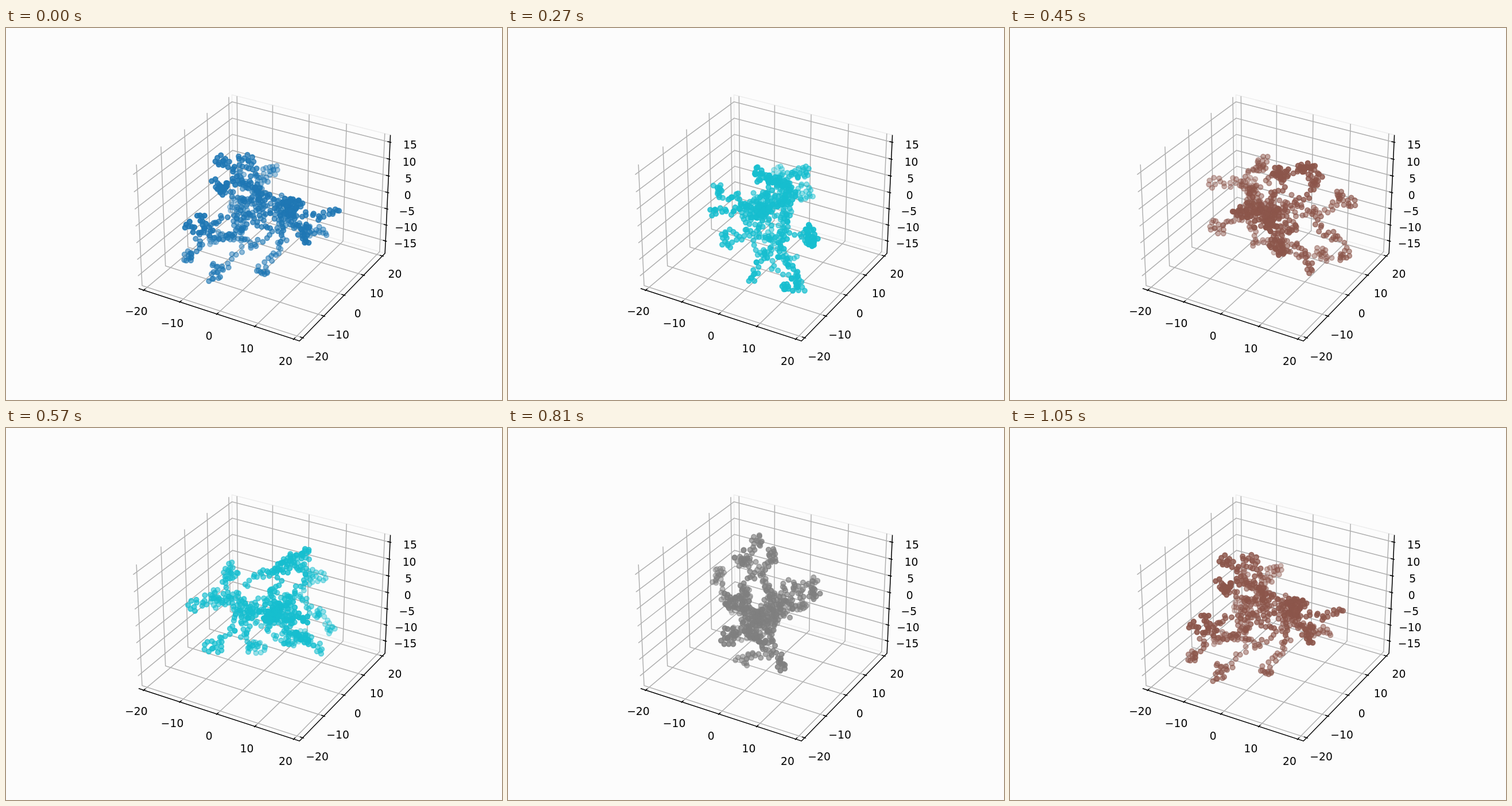
These frames come from a looping animation (864 by 648 pixels, 1080 ms). An HTML page with a canvas:

```html
<!DOCTYPE html>
<html lang="en">
<head>
<meta charset="utf-8">
<title>Rotating 3D scatter</title>
<style>
html, body { margin: 0; width: 100%; height: 100%; overflow: hidden; background: #fcfcfc; }
canvas { display: block; }
</style>
</head>
<body>
<canvas id="plot" width="864" height="648"></canvas>
<script>
const ctx = document.getElementById('plot').getContext('2d');
const COLORS = ['#1f77b4', '#ff7f0e', '#2ca02c', '#d62728', '#9467bd',
  '#8c564b', '#e377c2', '#7f7f7f', '#bcbd22', '#17becf'];
const STEP = 30, STEPS = 36;

// Box half sizes and data scales
const W = 0.59524, H = 0.44643;
const SX = W / 21.45, SZ = 0.024807, Z0 = 0.022;
const C30 = Math.sqrt(3) / 2;

// right, front and height relative to the box centre -> screen and nearness
function view(right, front, height) {
  const near = C30 * front + 0.5 * height;
  const k = 2697 / (10 - near);
  return { x: 449.55 + right * k, y: 320.5 - (C30 * height - 0.5 * front) * k, near };
}
const box = (x, y, z) => view(C30 * x + 0.5 * y, 0.5 * x - C30 * y, z);

function line(color, width, ...pts) {
  ctx.strokeStyle = color;
  ctx.lineWidth = width;
  ctx.beginPath();
  for (const p of pts) ctx.lineTo(p.x, p.y);
  ctx.stroke();
}

function label(value, p, dx, dy) {
  const text = value < 0 ? '\u2212' + -value : String(value);
  ctx.fillText(text, p.x + dx, p.y + dy + 6.2);
}

function drawAxes() {
  const grid = (...pts) => line('#b0b0b0', 1.5, ...pts);
  const axis = (...pts) => line('#000', 1.5, ...pts);
  const inner = 0.019, outer = inner / 2;

  line('#ececec', 1.35, box(-W, W, -H), box(-W, W, H), box(W, W, H), box(W, W, -H), box(-W, W, -H));
  for (let v = -20; v <= 20; v += 10) {
    const t = v * SX;
    grid(box(t, -W, -H), box(t, W, -H), box(t, W, H));
    grid(box(W, t, -H), box(-W, t, -H), box(-W, t, H));
  }
  for (let v = -15; v <= 15; v += 5) {
    const t = v * SZ + Z0;
    grid(box(-W, -W, t), box(-W, W, t), box(W, W, t));
  }

  axis(box(-W, -W, -H), box(W, -W, -H), box(W, W, -H), box(W, W, H));

  ctx.fillStyle = '#000';
  ctx.font = '18.75px "DejaVu Sans", sans-serif';
  ctx.textAlign = 'center';
  for (let v = -20; v <= 20; v += 10) {
    const t = v * SX;
    axis(box(t, -W - outer, -H), box(t, -W + inner, -H));
    axis(box(W + outer, t, -H), box(W - inner, t, -H));
    label(v, box(t, -W, -H), -13.7 - v * 0.03, 38.2 + v * 0.04);
    label(v, box(W, t, -H), 23.6 - v * 0.085, 32.6 - v * 0.04);
  }
  for (let v = -15; v <= 15; v += 5) {
    const t = v * SZ + Z0;
    axis(box(W + outer, W, t), box(W - inner, W, t));
    label(v, box(W, W, t), 34.7 + v * 0.02, 4.8);
  }
}

let seed = 11;
function rand() {
  seed = (seed + 0x6D2B79F5) | 0;
  let t = Math.imul(seed ^ (seed >>> 15), 1 | seed);
  t = (t + Math.imul(t ^ (t >>> 7), 61 | t)) ^ t;
  return ((t ^ (t >>> 14)) >>> 0) / 4294967296;
}
function randomStep(size) {
  const u = rand() * 2 - 1, a = rand() * 2 * Math.PI, r = Math.sqrt(1 - u * u);
  return [r * Math.cos(a) * size, r * Math.sin(a) * size, u * size];
}
const dist = (a, b) => Math.hypot(a[0] - b[0], a[1] - b[1], a[2] - b[2]);

// Outermost ends of the cluster: right, front, up
const TIPS = [
  [16, 4, 1], [13, -2, -8], [2, -11, 5], [-6, -12, 4], [-8, -9, -5],
  [-13, -3, -13], [-17, 4, -12], [-12, 8, -16], [0, 6, -15], [9, 10, -2],
  [6, 8, 7], [-16, 10, 1], [-11, 4, 11], [-9, 0, 14], [-3, -2, 14]
];
const CORE = [-1.5, 0.5, 0], CORE_RADIUS = 7, BRANCH = 37;

// Random walks from the core out to each tip, keeping clear of each other
function makeCluster() {
  const cluster = [];
  for (const tip of TIPS) {
    const offset = randomStep(CORE_RADIUS * Math.cbrt(rand()));
    let pos = CORE.map((v, j) => v + offset[j]);
    for (let left = BRANCH; left > 0; left--) {
      let next;
      for (let tries = 0; tries < 20; tries++) {
        const s = randomStep(left > 1 ? 1.15 : 0.3);
        next = pos.map((v, j) => v + (tip[j] - v) / left + s[j]);
        if (cluster.every(c => dist(c, next) > 1)) break;
      }
      cluster.push(next);
      pos = next;
    }
  }
  return cluster;
}
const cluster = makeCluster();

function drawPoints(step) {
  const a = step / (STEPS - 1) * 2 * Math.PI, c = Math.cos(a), s = Math.sin(a);
  const dots = cluster.map(([p, q, z]) =>
    view((p * c + q * s) * SX, (q * c - p * s) * SX, z * SZ + Z0));
  dots.sort((m, n) => m.near - n.near);
  const min = dots[0].near, span = dots[dots.length - 1].near - min;
  ctx.fillStyle = ctx.strokeStyle = COLORS[step % COLORS.length];
  ctx.lineWidth = 1.875;
  for (const d of dots) {
    ctx.globalAlpha = 0.3 + 0.7 * (d.near - min) / span;
    ctx.beginPath();
    ctx.arc(d.x, d.y, 4.19, 0, 2 * Math.PI);
    ctx.fill();
    ctx.stroke();
  }
  ctx.globalAlpha = 1;
}

let start = null, shown = -1;
function draw(step) {
  if (step === shown) return;
  shown = step;
  ctx.fillStyle = '#fcfcfc';
  ctx.fillRect(0, 0, 864, 648);
  drawAxes();
  drawPoints(step);
}
function tick() {
  const now = performance.now();
  if (start === null) start = now;
  draw(Math.floor((now - start) / STEP) % STEPS);
  requestAnimationFrame(tick);
}
tick();
</script>
</body>
</html>
```
